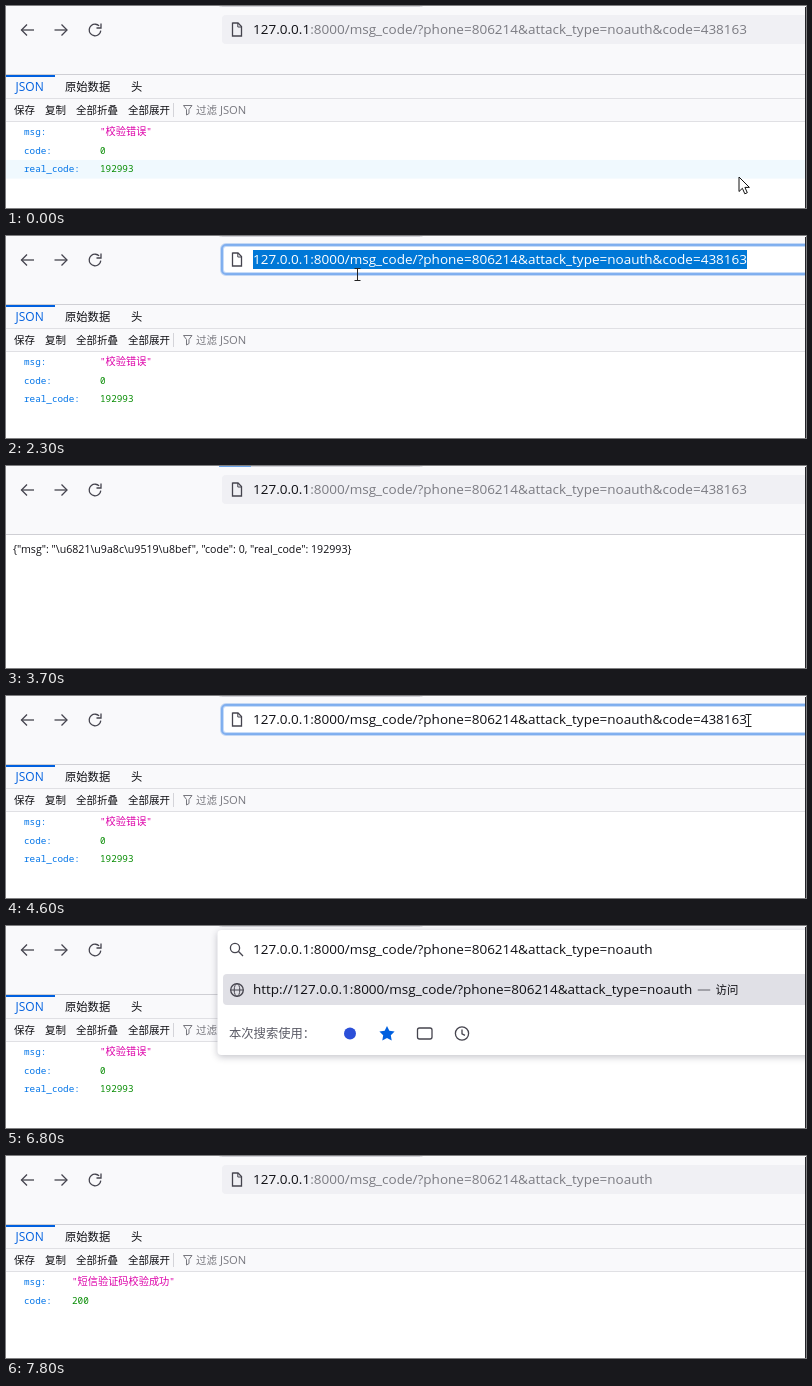
Recreate the animation shown at these times as an HTML page with a canvas. Size 800 by 202 pixels, loop 8 s.

```html
<!DOCTYPE html>
<html lang="zh-CN">
<head>
<meta charset="utf-8">
<title>JSON</title>
<style>
html, body { margin: 0; width: 800px; height: 202px; overflow: hidden; background: #fff; }
canvas { display: block; width: 800px; height: 202px; }
</style>
</head>
<body>
<canvas id="stage"></canvas>
<script>
const W = 800, H = 202, LOOP = 8000, STEP = 100;
const canvas = document.getElementById('stage');
const ctx = canvas.getContext('2d');
const ratio = window.devicePixelRatio || 1;
canvas.width = W * ratio;
canvas.height = H * ratio;

const UI = '"Open Sans", "Noto Sans", sans-serif';
const CJK = '"Noto Sans CJK SC", "Noto Sans CJK", sans-serif';
const MONO = '"Noto Sans Mono", "DejaVu Sans Mono", monospace';
const URL_FONT = `13.53px ${UI}`;
const HOST = '127.0.0.1';
const BASE = HOST + ':8000/msg_code/?phone=806214&attack_type=noauth';
const CODE = '438163';
const INK = '#0f0f14', ICON = '#45444e', BLUE = '#0060df';
const URL_X = 247;

const DENIED = {
  rows: [['msg', '校验错误'], ['code', 0], ['real_code', 192993]],
  valueX: 94,
  raw: '{"msg": "\\u6821\\u9a8c\\u9519\\u8bef", "code": 0, "real_code": 192993}'
};
const PASSED = {
  rows: [['msg', '短信验证码校验成功'], ['code', 200]],
  valueX: 66,
  raw: '{"msg": "\\u77ed\\u4fe1\\u9a8c\\u8bc1\\u7801\\u6821\\u9a8c\\u6210\\u529f", "code": 200}'
};

// Pointer paths: [time, x, y]
const FIRST_PATH = [[300, 733, 171], [400, 716, 163], [500, 662, 146], [600, 631, 142],
  [1200, 631, 142], [1300, 628, 141], [1700, 495, 98], [2000, 370, 45], [2100, 351, 38]];
const SECOND_PATH = [[4200, 762, 56], [4500, 742, 25], [4600, 742, 24], [4900, 696, 24]];
const ERASE_TIMES = [5400, 5700, 5900, 6100, 6400, 6700];

function along(path, t) {
  if (t <= path[0][0]) return path[0].slice(1);
  for (let i = 1; i < path.length; i++) {
    const [t1, x1, y1] = path[i];
    if (t <= t1) {
      const [t0, x0, y0] = path[i - 1];
      const k = (t - t0) / (t1 - t0);
      return [x0 + (x1 - x0) * k, y0 + (y1 - y0) * k];
    }
  }
  return path[path.length - 1].slice(1);
}

const between = (t, a, b) => t >= a && t < b;

function box(x, y, w, h, color) {
  ctx.fillStyle = color;
  ctx.fillRect(x, y, w, h);
}

function rounded(x, y, w, h, r) {
  ctx.beginPath();
  ctx.roundRect(x, y, w, h, r);
}

function outline(color = ICON, width = 1.3) {
  ctx.strokeStyle = color;
  ctx.lineWidth = width;
  ctx.stroke();
}

// Draws text and returns the x where it ends.
function text(str, x, y, font, color) {
  ctx.font = font;
  ctx.fillStyle = color;
  ctx.fillText(str, x, y);
  return x + ctx.measureText(str).width;
}

function line(points, color, width) {
  ctx.beginPath();
  points.forEach(([x, y]) => ctx.lineTo(x, y));
  outline(color, width);
}

function ring(x, y, r, from = 0, to = Math.PI * 2) {
  ctx.beginPath();
  ctx.arc(x, y, r, from, to);
  outline();
}

function chrome(loading) {
  box(0, 0, W, 68, '#f9f9fb');
  rounded(211.5, -20, 207, 20.5, 4);
  ctx.fillStyle = '#fff';
  ctx.fill();
  outline('#d0d0d6', 1);
  if (loading) box(213, 0, 32, 1, '#6aa3ea');
  box(0, 68, W, 1, '#cfcfd4');

  line([[28, 24], [15.5, 24]]);
  line([[21, 18.5], [15.5, 24], [21, 29.5]]);
  line([[48.5, 24], [61, 24]]);
  line([[55.5, 18.5], [61, 24], [55.5, 29.5]]);
  ring(89, 24, 5.8, 0.1, Math.PI * 1.75);
  line([[95, 17.5], [95, 22], [90.5, 22]]);
}

function pageIcon() {
  line([[226.5, 17], [232, 17], [235.5, 20.5], [235.5, 30], [226.5, 30], [226.5, 16.5]]);
  line([[231.8, 17], [231.8, 21], [235.5, 21]], ICON, 1);
}

function addressBar(url, focused, selectFrom) {
  rounded(216, 9, 600, 29, 4);
  ctx.fillStyle = focused ? '#fff' : '#f0f0f4';
  ctx.fill();
  if (focused) {
    outline('rgba(0,96,223,.22)', 4);
    outline('rgba(0,96,223,.35)', 2);
  }
  pageIcon();
  if (!focused) {
    const x = text(HOST, URL_X, 28, URL_FONT, INK);
    text(url.slice(HOST.length), x, 28, URL_FONT, '#7b7b82');
    return;
  }
  const end = text(url, URL_X, 28, URL_FONT, INK);
  if (selectFrom !== null && selectFrom < end) {
    ctx.save();
    ctx.beginPath();
    ctx.rect(selectFrom, 14, end - selectFrom, 19);
    ctx.clip();
    box(selectFrom, 14, end - selectFrom, 19, '#0078d7');
    text(url, URL_X, 28, URL_FONT, '#fff');
    ctx.restore();
  }
}

function rawPage(data) {
  text(data.raw, 7, 87, `10.62px ${UI}`, INK);
}

function jsonPage(data, hover) {
  box(0, 69, W, 46, '#f9f9fb');
  box(0, 69, 49, 2, BLUE);
  box(0, 92, W, 1, '#e0e0e4');
  box(0, 115, W, 1, '#e0e0e4');
  const tab = `500 11.3px ${CJK}`;
  text('JSON', 9.5, 85, `12px ${UI}`, BLUE);
  text('原始数据', 59, 85, tab, INK);
  text('头', 125, 85, tab, INK);

  const tool = `10.5px ${CJK}`;
  [['保存', 8], ['复制', 39], ['全部折叠', 70], ['全部展开', 122]]
    .forEach(([label, x]) => text(label, x, 108, tool, INK));
  box(167, 97, 1, 14, '#d4d4d9');
  line([[177.5, 99.5], [186, 99.5], [183, 103.5], [183, 107.5], [180.5, 109],
    [180.5, 103.5], [177.5, 99.5]], '#77777e', 1);
  const x = text('过滤 ', 190, 108, tool, '#77777e');
  text('JSON', x + 0.6, 108, `11.2px ${UI}`, '#77777e');

  const mono = `500 9.3px ${MONO}`;
  data.rows.forEach(([key, value], i) => {
    const top = 116.5 + i * 18.7, y = 129 + i * 18.7;
    if (i === hover) box(0, top, W, 18.7, '#f0f9fe');
    text(key + ':', 18, y, mono, '#0074e8');
    if (typeof value === 'number') {
      text(String(value), data.valueX, y, mono, '#058b00');
    } else {
      const pink = '#dd00a9';
      let vx = text('"', data.valueX, y, mono, pink);
      vx = text(value, vx, y, `10.2px ${CJK}`, pink);
      text('"', vx, y, mono, pink);
    }
  });
}

function star(x, y, r) {
  ctx.beginPath();
  for (let i = 0; i < 10; i++) {
    const a = -Math.PI / 2 + i * Math.PI / 5, d = i % 2 ? r * 0.5 : r;
    ctx.lineTo(x + Math.cos(a) * d, y + Math.sin(a) * d);
  }
  ctx.closePath();
  ctx.fillStyle = BLUE;
  ctx.fill();
}

function popup(url) {
  ctx.save();
  ctx.shadowColor = 'rgba(40,40,60,.28)';
  ctx.shadowBlur = 7 * ratio;
  ctx.shadowOffsetY = 2 * ratio;
  rounded(211.5, 4, 620, 125, 4);
  ctx.fillStyle = '#fff';
  ctx.fill();
  ctx.restore();

  ring(229, 22, 4.6);
  line([[232.3, 25.3], [237, 30]]);
  text(url, URL_X, 28, URL_FONT, INK);

  rounded(217, 48, 600, 31, 4);
  ctx.fillStyle = '#e0e0e6';
  ctx.fill();
  ring(231, 64, 6.3);
  ctx.beginPath();
  ctx.ellipse(231, 64, 2.8, 6.3, 0, 0, Math.PI * 2);
  outline(ICON, 1);
  line([[224.7, 64], [237.3, 64]], ICON, 1);
  const end = text('http://' + url, URL_X, 68, URL_FONT, INK);
  line([[end + 5.5, 64], [end + 18, 64]], '#62626a', 1);
  text('访问', end + 23.3, 67.5, `11.4px ${CJK}`, INK);

  text('本次搜索使用：', 223, 112, `12.3px ${CJK}`, '#5b5b66');
  ctx.beginPath();
  ctx.arc(344, 107.5, 6, 0, Math.PI * 2);
  ctx.fillStyle = '#2b4fd8';
  ctx.fill();
  star(381, 108, 8);
  rounded(411.5, 102, 14.5, 11, 2);
  outline();
  ring(456, 107.5, 6.6);
  line([[456, 103.5], [456, 107.8], [459, 109.3]]);
}

function arrow(x, y) {
  ctx.beginPath();
  [[0, 0], [0, 14.5], [3.4, 11.3], [5.8, 16.8], [8.3, 15.7], [5.9, 10.4], [10.4, 10.4]]
    .forEach(([dx, dy]) => ctx.lineTo(x + dx, y + dy));
  ctx.closePath();
  ctx.fillStyle = '#fff';
  ctx.fill();
  outline('#111', 1);
}

function beam(px, py) {
  const x = Math.round(px) + 0.5, y = Math.round(py) + 0.5;
  line([[x, y - 6], [x, y + 6]], '#222', 1);
  line([[x - 3, y - 6], [x + 3, y - 6]], '#222', 1);
  line([[x - 3, y + 6], [x + 3, y + 6]], '#222', 1);
}

function pointerAt(t) {
  if (t < 2500) return along(FIRST_PATH, t);
  if (between(t, 4200, 5100)) return along(SECOND_PATH, t);
  return null;
}

function urlAt(t) {
  if (t < 5100) return BASE + '&code=' + CODE;
  const erased = ERASE_TIMES.filter(at => t >= at).length;
  return BASE + '&code='.slice(0, 6 - erased);
}

function draw(t) {
  ctx.setTransform(ratio, 0, 0, ratio, 0, 0);
  box(0, 0, W, H, '#fff');

  const pointer = pointerAt(t);
  const hover = pointer && pointer[1] >= 116.5 ? Math.floor((pointer[1] - 116.5) / 18.7) : -1;
  const data = t >= 7400 ? PASSED : DENIED;
  const raw = between(t, 3500, 3900) || between(t, 7400, 7600);
  const loading = between(t, 2500, 3100) || between(t, 3300, 4000) || between(t, 7300, 7700);
  const dragging = between(t, 4500, 5100);
  const selected = between(t, 2200, 2500);

  chrome(loading);
  if (raw) rawPage(data);
  else jsonPage(data, hover);

  if (between(t, 5100, 7300)) {
    popup(urlAt(t));
  } else {
    const from = selected ? URL_X : dragging ? pointer[0] : null;
    addressBar(urlAt(t), selected || dragging, from);
  }

  if (pointer) {
    const [x, y] = pointer;
    const overBar = t >= 2500 || y < 42;
    (overBar ? beam : arrow)(x, y);
  }
  box(799, 1, 1, H, '#25252a');
}

function tick(now) {
  draw(Math.floor((now % LOOP) / STEP) * STEP);
  requestAnimationFrame(tick);
}
draw(0);
requestAnimationFrame(tick);
</script>
</body>
</html>
```
